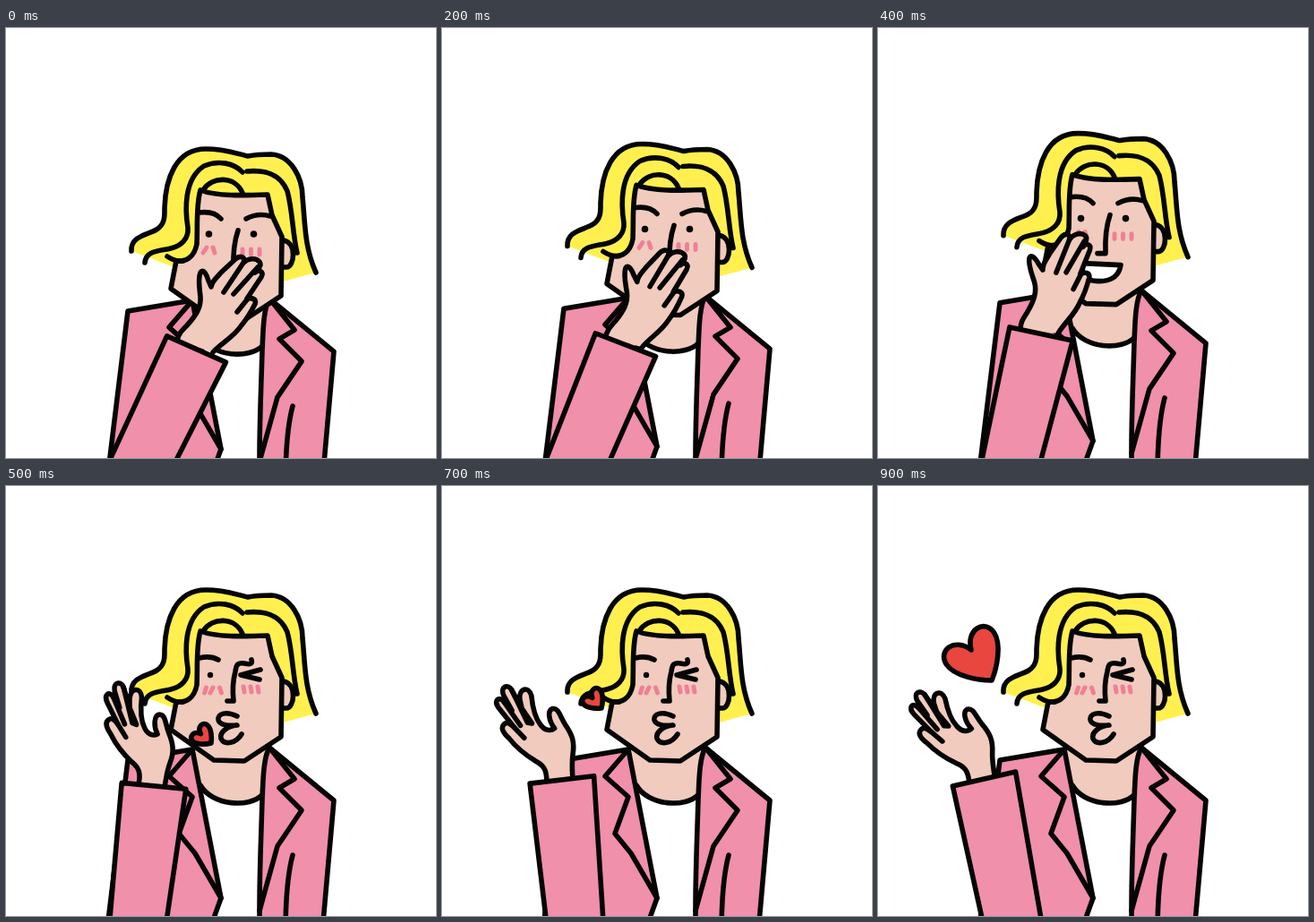
An HTML page for the animation above (1000 ms loop, 480x480 px).

```html
<!DOCTYPE html>
<html lang="en">
<head>
<meta charset="utf-8">
<title>Blown kiss</title>
<style>
  html, body { margin: 0; width: 100%; height: 100%; overflow: hidden; background: #fff; }
  svg { display: block; width: 100vw; height: 100vh; }
  .ink { stroke: #050505; stroke-width: 5.6; stroke-linecap: round; stroke-linejoin: round; fill: none; }
  .skin { fill: #f1cbbd; }
  .cloth { fill: #f090ab; }
  .hair { fill: #fff04f; }
  .dot { fill: #050505; stroke: none; }
  .blush { stroke: #ef7f97; stroke-width: 4.9; }
  .heart { fill: #e8463f; vector-effect: non-scaling-stroke; }
</style>
</head>
<body>
<svg viewBox="0 0 480 480" class="ink">
  <g id="body">
    <path class="skin" stroke="none" d="M206 284L217 334C228 358 275 358 287 343L292 284Z"/>
    <path d="M217 334C230 357 272 360 287 344"/>
    <path class="cloth" d="M136 306L208 294L240 460L222 510H111Z"/>
    <path d="M208 294L182 324L208 347L193 388L211 410L240 460"/>
    <path class="cloth" d="M294 292L366 351L352 510H283V470C283 430 285 385 286 350C287 330 287 304 294 292Z"/>
    <path d="M294 292L322 327L305 337L330 362L303 402L283 474"/>
    <path d="M320 412Q312 442 312 500"/>
  </g>

  <g id="head">
    <path class="hair" stroke="none" d="M346 254L309 264L290 190ZM140 230L188 248L215 222V190Z"/>
    <path class="hair" d="M140 230C139 213 158 212 168 206C178 200 177 190 177 182C178 150 189 116 223 116C245 116 256 121 270 124C280 122 285 122 296 122C318 123 331 148 331 170C334 200 333 225 346 254"/>
    <path class="skin" d="M310 218C325 221 322 248 313 248H308"/>
    <path class="skin" d="M217 162C212 180 214 200 213 222C210 238 200 242 190 241L184 272L232 306L266 307L307 280L308 214L297 190L292 167C265 168 235 169 217 162Z"/>
    <path d="M155 243C156 229 172 230 184 227C196 224 204 216 203 204C200 185 198 150 221 135C237 128 255 132 264 142"/>
    <path d="M269 141C290 139 306 144 314 163C320 185 320 212 325 232"/>
    <path d="M180 236C186 240 192 242 198 241M220 162C230 146 256 146 264 165"/>

    <g id="calm">
      <path d="M216 187Q232 185 240 194M268 194Q281 187 295 191"/>
      <circle class="dot" cx="226.5" cy="211" r="3.8"/>
      <circle class="dot" cx="276.5" cy="211" r="3.8"/>
      <path d="M259 207Q253 224 254 250H245"/>
      <path id="grin" fill="#fff" d="M229 261L271 263Q268 281 247 281Q232 281 228 272Z"/>
    </g>

    <g id="kiss">
      <path d="M216 192Q228 189 237 194"/>
      <circle class="dot" cx="228" cy="211" r="3.2"/>
      <path d="M284 205L262 211L283 216"/>
      <path d="M274 194C276 200 270 199 266 198C258 197 257 200 256 207Q252 222 254 240H247"/>
      <path d="M258 257C246 251 236 254 237 261C238 267 249 268 258 267C247 268 238 275 240 282C244 290 257 287 263 277"/>
    </g>
  </g>

  <path id="heart" class="heart" d="M0 0C-12 -8 -32 -27 -32 -43C-32 -61 -8 -64 0 -41C8 -64 32 -61 32 -43C32 -27 12 -8 0 0Z"/>

  <g id="cover">
    <path class="skin" d="M191 349C192 342 196 338 202 332C212 321 218 312 217 300C216 290 214 280 217 273C220 268 224 275 226 282L229 289C230 282 236 278 240 273L256 258C262 253 268 256 265 262C270 257 279 256 283 261C286 265 281 270 278 273C283 269 288 272 285 278L269 302C274 301 280 302 278 308C274 316 268 326 262 333C254 345 240 352 231 362"/>
    <path d="M265 262L243 295M281 267L254 297M270 302L258 317"/>
  </g>

  <g id="open">
    <path class="skin" d="M117 328C117 316 114 311 105 306C94 299 82 288 76 280C70 274 66 268 71 264C74 261 78 264 82 268L79 264L66 247C59 238 65 232 71 239L80 249L71 232C67 222 76 219 80 226L91 247L89 237C88 224 99 222 102 233C103 246 105 257 111 265C116 273 123 273 127 270C121 262 119 250 125 248C132 247 133 256 139 266C147 278 149 286 147 298C145 310 146 316 146 328"/>
    <path d="M82 268L93 280M71 239L89 266"/>
    <path fill="#050505" d="M80 226L97 263L102 264L91 247"/>
  </g>

  <path id="sleeve" class="cloth"/>
</svg>

<script>
  const LOOP = 1000, STEP = 100, LAST = 9;
  const KISS = 5;   // step at which the hand leaves the mouth
  const CUFF = 36;  // half the cuff width
  const REACH = { from: 212.5, kiss: 165, to: 118.5 };

  const $ = id => document.getElementById(id);
  const clamp = t => Math.min(1, Math.max(0, t));
  const lerp = (a, b, t) => a + (b - a) * t;
  const easeInOut = t => t < .5 ? 2 * t * t : 1 - 2 * (1 - t) ** 2;
  const easeOut = t => 1 - (1 - t) ** 1.6;
  const show = (id, on) => $(id).style.display = on ? '' : 'none';
  const place = (id, value) => $(id).setAttribute('transform', value);

  // A row of short strokes; each lean shifts the foot of one stroke.
  function cheek(id, x, y, gap, leans) {
    const d = leans.map((lean, i) => `M${x + i * gap} ${y}l${lean} 6`).join('');
    $(id).insertAdjacentHTML('afterbegin', `<path class="blush" d="${d}"/>`);
  }
  cheek('calm', 224, 226, 7, [-4, 2]);
  cheek('calm', 264, 228, 9.5, [0, 0, 0]);
  cheek('kiss', 223.5, 225, 7.5, [-2, -3, 2]);
  cheek('kiss', 265, 224, 8, [1, 1, 1]);

  // The cuff swings along a parabola and tilts as it moves sideways.
  const armAt = x => ({
    x,
    y: 327 + .00353 * (x - 118) ** 2,
    angle: .39 * (x - 118.5) - 12.7
  });

  const reachAt = step => step < KISS
    ? lerp(REACH.from, REACH.kiss, (step / KISS) ** 2)
    : lerp(REACH.kiss, REACH.to, easeOut((step - KISS) / (LAST - KISS)));

  // Turn a hand with the arm, given the pose it was drawn in.
  function attach(id, home, arm) {
    place(id, `translate(${arm.x} ${arm.y}) rotate(${arm.angle - home.angle}) translate(${-home.x} ${-home.y})`);
  }

  function drawSleeve({ x, y, angle }) {
    const rad = angle * Math.PI / 180;
    const dx = CUFF * Math.cos(rad), dy = CUFF * Math.sin(rad);
    const elbow = 179 + 11 * ((x - 150) / 62) ** 2;
    $('sleeve').setAttribute('d',
      `M116 482L${x - dx} ${y - dy}L${x + dx} ${y + dy}L${elbow} 482`);
  }

  function drawHeart(t) {
    const p = easeInOut(t);
    const size = lerp(.38, 1, easeInOut(clamp(t * 2 - 1)));
    const x = lerp(229, 127, p), y = lerp(287, 217, p) - 16 * p * (1 - p);
    place('heart', `translate(${x} ${y}) rotate(${lerp(-48, -34, p)}) scale(${size})`);
  }

  function draw(time) {
    const step = Math.floor(time % LOOP / STEP);
    const kissing = step >= KISS;
    const drop = 19 * (1 - easeInOut(clamp((step - .15) / (KISS - .15))));
    const arm = armAt(reachAt(step));

    place('head', `translate(0 ${drop})`);
    place('body', `translate(0 ${drop * .53})`);
    show('calm', !kissing);
    show('cover', !kissing);
    show('grin', step >= 3);
    show('kiss', kissing);
    show('open', kissing);
    show('heart', kissing);

    attach('cover', armAt(REACH.from), arm);
    attach('open', { x: 134, y: 327.5, angle: -5.5 }, arm);
    drawSleeve(arm);
    if (kissing) drawHeart((step - KISS) / (LAST - KISS));
  }

  function tick() {
    draw(performance.now());
    requestAnimationFrame(tick);
  }
  tick();
</script>
</body>
</html>
```
